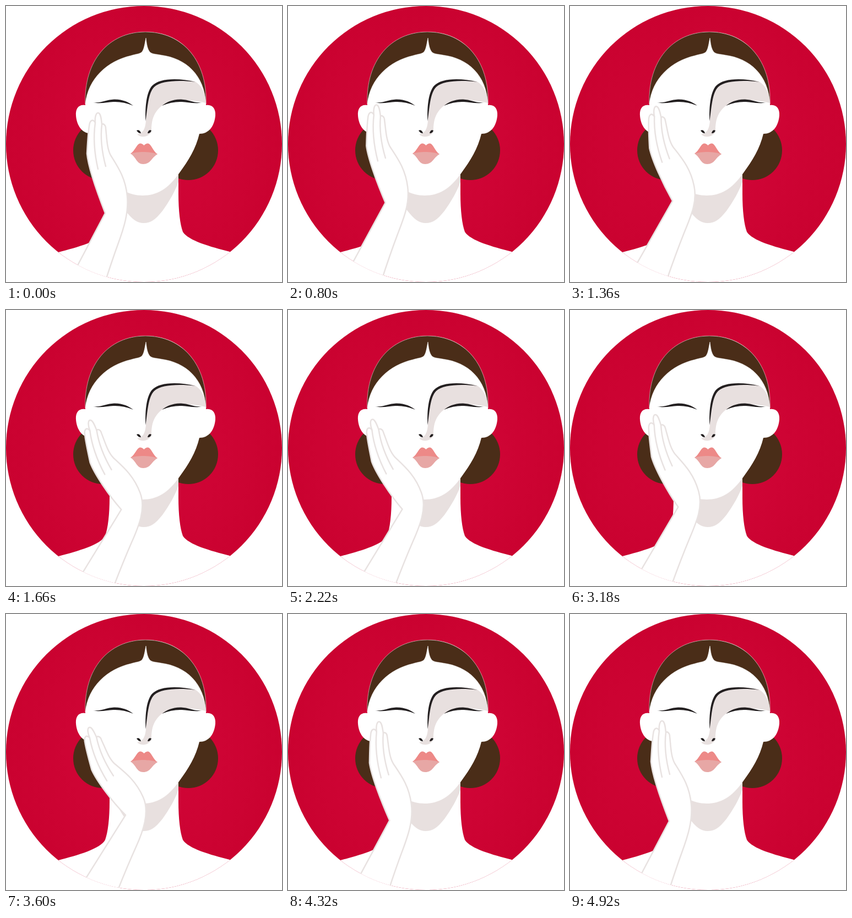
Animation, 501 px wide and 501 px high, one loop 5.02 s. Source, as an HTML page:

```html
<!DOCTYPE html>
<html lang="en">
<head>
<meta charset="utf-8">
<title>Woman touching her cheek</title>
<style>
  html, body { margin: 0; width: 100%; height: 100%; overflow: hidden; background: #fff; }
  svg { display: block; width: 100vw; height: 100vh; }
</style>
</head>
<body>
<svg viewBox="0 0 501 501">
  <defs>
    <radialGradient id="backdrop">
      <stop offset="0" stop-color="#d30639"/>
      <stop offset="1" stop-color="#ca0230"/>
    </radialGradient>
    <clipPath id="disc"><circle cx="250.5" cy="250.5" r="250.5"/></clipPath>
    <path id="eye" d="M158 175C172 177 182 170 196 169.5C212 169 223 175 231 181C219 176 207 173.5 195 174C183 174.5 172 178 158 175Z"/>
  </defs>

  <circle cx="250.5" cy="250.5" r="250.5" fill="url(#backdrop)"/>
  <g clip-path="url(#disc)">
    <g fill="#4a2d18">
      <circle cx="176" cy="262" r="54"/>
      <circle cx="331" cy="262" r="54"/>
    </g>

    <!-- neck and shoulders -->
    <path fill="#fff" d="M188 290V340C188 372 185 396 180 410C172 426 130 438 95 447L60 520H441L406 446C371 437 331 426 321 410C316 396 313 372 313 340V290Z"/>
    <path fill="#e8e0df" d="M188 290V317C196 335 206 358 217 372C230 388 238 394 250 394C263 394 271 388 284 372C297 354 307 336 313 319V290Z"/>

    <!-- head and ears -->
    <path fill="#fff" d="M144 180C143 100 186 47 254 47C322 47 365 100 363 180C375 178 381 187 380 199C378 219 368 232 351 232C345 258 331 281 314 304C294 332 274 344 248 344C224 344 201 332 185 308C168 284 155 258 150 231C136 229 128 214 127 199C126 186 132 178 144 180Z"/>
    <path fill="#4a2d18" stroke="#fff" stroke-width=".5" d="M144 178C141 100 186 47 253 47C321 47 366 100 363 178C360 125 327 95 281 89C270 87 263 87 260 82C256 76 255 66 254 58C252 67 251 78 247 83C244 87 236 87 227 90C184 100 149 131 144 178Z"/>

    <!-- shaded brow and nose -->
    <path fill="#e8e0df" d="M254 208C254 150 262 134 300 133C316 132 331 134 343 137C355 144 362 158 363 176C335 170 306 168 283 181C268 193 264 207 264 226C262 237 246 241 238 233C249 232 253 222 254 208Z"/>
    <g fill="#231f20">
      <path d="M253.500 209C252 180 256 155 265 145C278 131 312 130 344 138C312 134 281 136 269 147C258 158 257 184 253.500 209Z"/>
      <use href="#eye"/>
      <use href="#eye" transform="translate(514) scale(-1 1)"/>
      <path d="M237 226C241 224 244 227 245 231C241 231 239 229 237 226Z"/>
      <path d="M264 226C260 224 258 227 257 231C261 231 263 229 264 226Z"/>
    </g>

    <path fill="#ed8987" d="M226 268C234 263 237 251 243 249.500Q247 249 250.500 253Q254 249 258 249.500C264 251 267 264 275 269Z"/>
    <path fill="#e7a7a5" d="M226 268C238 264 262 264 275 269C264 275 263 287 249 287C237 287 237 275 226 268Z"/>

    <g stroke="#e8e2e1" stroke-width="2.500" stroke-linecap="round" stroke-linejoin="round">
      <path id="arm" fill="#fff"/>
      <path id="fingers" fill="none"/>
    </g>
  </g>
</svg>
<script>
const LOOP = 5020;
const arm = document.getElementById('arm');
const fingers = document.getElementById('fingers');

// The hand turns about its longest fingertip, the forearm about the wrist.
const pose = (tip, handTurn, wrist, armTurn) => [...tip, handTurn, ...wrist, armTurn];
const rest = pose([167, 194], 0, [180, 376], 0);
const high = pose([158, 174], -2, [175.5, 350], 1);
const tilted = pose([151, 206], -18.4, [217, 365], 4.3);

const smooth = [0.333, 0.667];
const moves = [
  { start: 0, end: 1075, from: rest, to: high, ease: [0.7, 0.67] },
  { start: 1110, end: 1870, from: high, to: tilted, ease: smooth },
  { start: 1985, end: 2745, from: tilted, to: high, ease: smooth },
  { start: 2790, end: 3570, from: high, to: tilted, ease: smooth },
  { start: 3600, end: 4920, from: tilted, to: rest, ease: [0.33, 0.06] }
];

// Cubic timing curve with flat ends, solved by bisection.
function easeInOut(u, [x1, x2]) {
  let low = 0, top = 1, s = u;
  for (let i = 0; i < 24; i++) {
    s = (low + top) / 2;
    const x = 3 * (1 - s) ** 2 * s * x1 + 3 * (1 - s) * s * s * x2 + s ** 3;
    if (x < u) low = s; else top = s;
  }
  return s * s * (3 - 2 * s);
}

function poseAt(time) {
  const move = moves.filter(m => m.start <= time).pop();
  const u = Math.min(1, (time - move.start) / (move.end - move.start));
  const p = easeInOut(u, move.ease);
  return move.from.map((v, i) => v + (move.to[i] - v) * p);
}

function placer(restX, restY, x, y, degrees) {
  const a = degrees * Math.PI / 180, c = Math.cos(a), s = Math.sin(a);
  return (px, py) => {
    const dx = px - restX, dy = py - restY;
    return `${(x + dx * c - dy * s).toFixed(2)} ${(y + dx * s + dy * c).toFixed(2)} `;
  };
}

function draw(time) {
  const [tipX, tipY, handTurn, wristX, wristY, armTurn] = poseAt(time);
  const h = placer(rest[0], rest[1], tipX, tipY, handTurn);
  const f = placer(rest[3], rest[4], wristX, wristY, armTurn);

  arm.setAttribute('d',
    'M' + f(104, 520) + 'L' + f(170, 395) + 'L' + f(180, 376) +
    'C' + h(164, 335) + h(149, 290) + h(147, 268) +
    'C' + h(148, 250) + h(149, 230) + h(151, 218) +
    'C' + h(152, 207) + h(158, 204) + h(162, 212) +
    'C' + h(161, 203) + h(163, 194) + h(167, 194) +
    'C' + h(172, 194) + h(173, 205) + h(174, 215) +
    'C' + h(176, 213) + h(181, 215) + h(181, 222) +
    'C' + h(183, 240) + h(183, 258) + h(190, 271) +
    'C' + h(203, 292) + h(217, 312) + h(220, 345) +
    'C' + h(223, 375) + f(214, 403) + f(203, 433) +
    'C' + f(195, 455) + f(188, 475) + f(174, 520) + 'Z');

  fingers.setAttribute('d',
    'M' + h(162, 212) + 'C' + h(158, 240) + h(161, 270) + h(167, 296) +
    'M' + h(174, 215) + 'C' + h(171, 240) + h(174, 265) + h(181, 291));
}

const began = performance.now();
function tick() {
  draw((performance.now() - began) % LOOP);
  requestAnimationFrame(tick);
}
tick();
</script>
</body>
</html>
```
